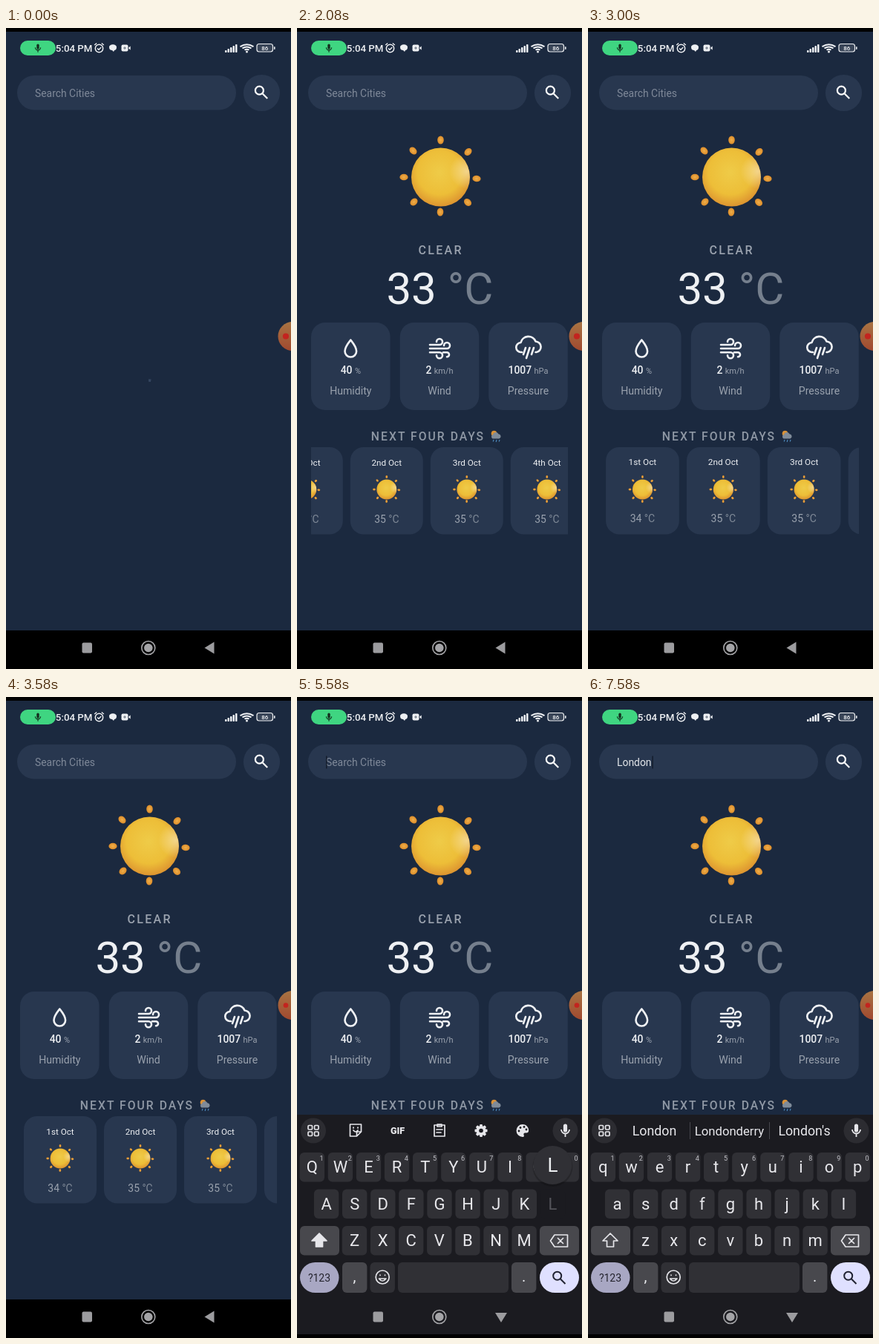
Write an HTML page that moves like this. It is 384 px wide and 864 px high and loops after 8000 ms.

```html
<!DOCTYPE html>
<html lang="en">
<head>
<meta charset="utf-8">
<title>Weather app</title>
<style>
  html, body { margin: 0; width: 100%; height: 100%; overflow: hidden; background: #000; }
  svg { display: block; width: 384px; height: 864px; font-family: Roboto, sans-serif; }
  .line { fill: none; stroke: #f0f2f5; stroke-width: 2.6; stroke-linecap: round; stroke-linejoin: round; }
  .thin { stroke-width: 1.7; stroke: #e6e6ea; }
</style>
</head>
<body>
<script>
const LOOP = 8000;
const BG = '#1b293f', CARD = '#28374f', WHITE = '#eef0f3', GREY = '#9aa2ae', DIM = '#757f8d';
const KEYBOARD = '#1b1b20', KEY = '#303035', KEY_ALT = '#48484d';

const rect = (x, y, w, h, r, fill, more = '') =>
  `<rect x="${x}" y="${y}" width="${w}" height="${h}" rx="${r}" fill="${fill}" ${more}/>`;
const disc = (x, y, r, fill, more = '') => `<circle cx="${x}" cy="${y}" r="${r}" fill="${fill}" ${more}/>`;
const path = (d, more = 'class="line"') => `<path d="${d}" ${more}/>`;
const label = (x, y, size, text, fill = WHITE, more = '') =>
  `<text x="${x}" y="${y}" font-size="${size}" fill="${fill}" text-anchor="middle" ${more}>${text}</text>`;
const group = (content, more = '') => `<g ${more}>${content}</g>`;
const span = (text, fill, more = '') => `<tspan fill="${fill}" ${more}>${text}</tspan>`;

function sun(x, y, scale) {
  const rays = [[0, -50], [37, -34], [48.5, 2], [36.5, 34], [-.5, 47], [-36, 33.5], [-49.5, 0], [-37, -35.5]];
  const dots = rays.map(([dx, dy]) => {
    const angle = Math.atan2(dy, dx) * 180 / Math.PI;
    return `<ellipse rx="5.6" ry="4.3" fill="url(#ray)" transform="translate(${dx} ${dy}) rotate(${angle})"/>`;
  });
  return group(dots.join('') + disc(0, 0, 39.5, 'url(#sun)') + disc(0, 0, 39.5, 'url(#glint)'),
    `class="sun" transform="translate(${x} ${y}) scale(${scale})"`);
}

function magnifier(x, y, color, width) {
  return path(`M${x + 2.5} ${y + 2.5}l6.5 6.5M${x + 3.7} ${y - 1.8}a5.5 5.5 0 1 1-11 0a5.5 5.5 0 1 1 11 0z`,
    `fill="none" stroke="${color}" stroke-width="${width}"`);
}

function mic(x, y, scale, color) {
  return group(rect(-2.6, -8.5, 5.2, 11, 2.6, color) +
    path('M-5.5-1a5.5 5.5 0 0 0 11 0M0 5v4', `fill="none" stroke="${color}" stroke-width="1.8"`),
    `transform="translate(${x} ${y}) scale(${scale})"`);
}

function statusBar() {
  const bars = [0, 1, 2, 3, 4].map(i => rect(295 + i * 3.5, 30 - i * 2, 2.5, 3 + i * 2, .8, WHITE)).join('');
  const wifi = [[3, 28.8], [6, 25.6], [9, 22.4]].map(([w, y]) =>
    path(`M${324.5 - w} ${y + w * .3}Q324.5 ${y - w * .35} ${324.5 + w} ${y + w * .3}`,
      `fill="none" stroke="${WHITE}" stroke-width="2"`)).join('');
  return rect(19, 17, 48, 20, 10, '#3fd581') + mic(43, 27, .65, '#14301f') +
    label(91.7, 32, 13.3, '5:04 PM', WHITE, 'font-weight="500"') +
    disc(125.5, 27.5, 5.2, 'none', `stroke="${WHITE}" stroke-width="1.5"`) +
    path('M119.2 23l3-2.5M131.8 23l-3-2.5M123 27.5l2 1.8 3.2-3.4', `fill="none" stroke="${WHITE}" stroke-width="1.4"`) +
    path('M139 26c0-5 10-5 10 0 0 3-2 4-3 4l-1 2-2-2c-2 0-4-1-4-4z', `fill="${WHITE}"`) +
    rect(155.5, 22.5, 9, 9, 2, WHITE) + path('M164 27l4-3v6zM160 25v4M158 27h4', `fill="${WHITE}" stroke="${BG}" stroke-width=".6"`) +
    bars + wifi + disc(324.5, 32, 1.5, WHITE) +
    rect(338, 21.5, 21.5, 10.5, 3, '#ffffff22', `stroke="${WHITE}" stroke-width="1.2"`) +
    rect(361, 25, 1.6, 4, .8, WHITE) + label(348.7, 29.8, 8, '86', WHITE, 'font-weight="500"');
}

function stat(x, icon, value, unit, name) {
  return rect(x - 53.3, 397, 106.6, 118, 19, CARD) + icon +
    label(x, 465.5, 13.9, value + ' ' + span(unit, GREY, 'font-size="11" font-weight="400"'), WHITE, 'font-weight="500"') +
    label(x, 493.5, 14.1, name, GREY);
}

function forecast() {
  return [['1st', 34], ['2nd', 35], ['3rd', 35], ['4th', 35]].map(([day, degrees], i) => {
    const x = 24 + i * 108;
    return rect(x, 565, 98, 117.5, 18, CARD) + label(x + 49, 589.5, 11.7, day + ' Oct') + sun(x + 49, 622, .34) +
      label(x + 49, 666.5, 13.9, degrees + ' ' + span('°C', '#7f8997'), GREY);
  }).join('');
}

function page() {
  const drop = path('M72.3 420.5c4 5 7.8 9.6 7.8 15.2a7.8 7.8 0 0 1-15.6 0c0-5.6 3.8-10.2 7.8-15.2z');
  const wind = path('M179 427H192a4 4 0 1 0-4-4M179 432H202a4 4 0 1 0-4-4M179 437.3H192a4 4 0 1 1-4 4M197 437.3h5a3 3 0 0 1 0 6');
  const rain = path('M303 437h-1a6.5 6.5 0 0 1-.5-13a10.5 10.5 0 0 1 20-1.5a7.3 7.3 0 0 1 1 14.5h-1M308 431l-3 9M313.5 431l-4.5 14M319 431l-3 9');
  return sun(193.5, 201, 1) +
    label(193.6, 305, 16, 'CLEAR', GREY, 'font-weight="500" letter-spacing="2.3"') +
    label(192.3, 372, 60, '33 ' + span('°C', DIM)) +
    stat(72.3, drop, '40', '%', 'Humidity') + stat(192, wind, '2', 'km/h', 'Wind') + stat(311.5, rain, '1007', 'hPa', 'Pressure') +
    label(176.5, 556, 15.7, 'NEXT FOUR DAYS', '#8f98a5', 'font-weight="500" letter-spacing="2.05"') +
    disc(265.5, 546.5, 3.8, '#d99238') +
    path('M263.5 553.5a3 3 0 0 1 .5-5.500a4 4 0 0 1 7.500-.7a3.200 3.200 0 0 1 1 6.200z', 'fill="#7f8b99"') +
    path('M265 555l-.8 2.500M269 555l-.8 3M273 555l-.8 2.500', 'stroke="#4c86b8" stroke-width="1.2"') +
    group(group(forecast(), 'id="cards"'), 'clip-path="url(#strip)"');
}

const keys = {};

function keyRow(letters, x, y) {
  return [...letters].map((letter, i) => {
    const cx = x + i * 38.1;
    keys[letter] = { x: cx, y: y + 19.5 };
    const digit = y === 614 ? label(cx + 12.8, y + 11, 9, (i + 1) % 10, '#c4c4ca') : '';
    return rect(cx - 16.7, y, 33.4, 39.5, 6, KEY, `id="box-${letter}"`) +
      label(cx, y + 27.3, 22, letter, '#e8e8ec', `id="key-${letter}"`) + digit;
  }).join('');
}

function toolbar() {
  const gear = [0, 45, 90, 135].map(a => rect(-1.9, -8.5, 3.8, 17, 1, '#e6e6ea', `transform="rotate(${a})"`)).join('');
  return path('M71.500 576h15v10l-6 6h-9zM86 586h-5.500v5.500M76 584q3 4 6 0M76 580v1M82 580v1', 'class="line thin"') +
    label(135.5, 588.6, 12.5, 'GIF', '#e6e6ea', 'font-weight="900"') +
    path('M185 577h14v15h-14zM189 576h6v3h-6zM188 583h8M188 587h6', 'class="line thin"') +
    group(gear + disc(0, 0, 6.5, '#e6e6ea') + disc(0, 0, 2.8, KEYBOARD), 'transform="translate(248 584.5)"') +
    path('M304 576a8.500 8.500 0 1 0 0 17c2.500 0 2-2 1.500-3s0-2.500 2-2.500h2c5 0 3-11.500-5.500-11.500z', 'fill="#e6e6ea"') +
    [[299, 585], [301, 580.500], [306, 579.500], [309, 583]].map(([x, y]) => disc(x, y, 1.400, KEYBOARD)).join('');
}

function keyboard() {
  const grid = [15, 23.5].map(x => [577.5, 586].map(y => rect(x, y, 5.5, 5.5, 1.2, 'none', 'class="thin" stroke="#e6e6ea"')).join('')).join('');
  const suggestions = [89.500, 190.500, 291.500].map((x, i) => label(x, 591, 17.8, '', '#e8e8ec', `id="hint${i}"`)).join('') +
    path('M137.500 573v23M244.500 573v23', 'stroke="#46464c"');
  return disc(22, 584.5, 17, '#2c2c31') + grid + disc(361.5, 584.5, 17, '#2c2c31') + mic(361.5, 584, 1, '#e6e6ea') +
    group(toolbar(), 'id="tools"') + group(suggestions, 'id="hints"') +
    keyRow('qwertyuiop', 20.3, 614) + keyRow('asdfghjkl', 39.6, 663.5) + keyRow('zxcvbnm', 77.5, 713) +
    rect(4, 713, 53, 39.5, 6, KEY_ALT) +
    path('M30 723l10 10h-5.500v8h-9v-8h-5.500z', 'id="shift" class="line thin"') +
    rect(327, 713, 53, 39.5, 6, KEY_ALT) +
    path('M347 725h17.500v16h-17.500l-5.500-8zM351.500 729.500l7 7M358.500 729.500l-7 7', 'class="line thin"') +
    rect(4, 762, 52.5, 41, 20.5, '#a8a7c3') + label(30, 787.5, 14, '?123', '#24242e') +
    rect(61, 762, 33.4, 41, 6, KEY_ALT) + label(77.5, 788, 20, ',') +
    rect(98.5, 762, 33.4, 41, 6, KEY) + disc(115.2, 782, 9, 'none', 'class="thin" stroke="#e6e6ea"') +
    path('M110.500 784q4.700 6 9.400 0zM112 779v.5M118.500 779v.5', 'class="line thin"') +
    rect(136, 762, 149, 41, 6, KEY) + rect(289, 762, 33.4, 41, 6, KEY_ALT) + label(305.7, 788, 20, '.') +
    rect(327, 762, 53, 41, 20.5, '#dfe0ff') + magnifier(352.5, 782, '#202231', 2) +
    group(disc(0, 2, 27, '#0003') + disc(0, 0, 26, '#303035') + label(0, 9, 26, '', WHITE, 'id="pressed"'), 'id="popup"');
}

document.body.innerHTML = `<svg viewBox="0 0 384 864" xmlns="http://www.w3.org/2000/svg">
  <defs>
    <radialGradient id="sun" cx=".48" cy=".42" r=".58">
      <stop offset="0" stop-color="#efcb48"/><stop offset=".65" stop-color="#edbe38"/><stop offset="1" stop-color="#dd9430"/>
    </radialGradient>
    <radialGradient id="glint" cx=".95" cy=".4" r=".3">
      <stop offset="0" stop-color="#f8e3a8" stop-opacity=".75"/><stop offset="1" stop-color="#f8e3a8" stop-opacity="0"/>
    </radialGradient>
    <radialGradient id="ray"><stop offset="0" stop-color="#f0b04a"/><stop offset="1" stop-color="#dc8c2a"/></radialGradient>
    <linearGradient id="bubble" x2="0" y2="1"><stop offset="0" stop-color="#a87443"/><stop offset="1" stop-color="#a1492f"/></linearGradient>
    <clipPath id="strip"><rect x="19" y="560" width="346" height="130"/></clipPath>
    <clipPath id="above"><rect width="384" height="812"/></clipPath>
  </defs>
  ${rect(0, 0, 384, 864, 0, '#000') + rect(0, 5, 384, 807, 0, BG) + statusBar()}
  ${rect(15, 64, 295, 46.5, 23.2, CARD) + disc(344.5, 87.5, 24.6, CARD) + magnifier(343.2, 86, '#fff', 2.2)}
  <text id="query" x="39" y="93" font-size="13.9"></text>
  ${rect(39, 79.5, 1.5, 17, 0, '#141d2c', 'id="caret"')}
  <circle id="loader" cx="192" cy="492" r="17" fill="none" stroke="#34455f" stroke-width="3.5" pathLength="100"/>
  ${group(page(), 'id="page"')}
  ${disc(386, 415.5, 19.5, 'url(#bubble)') + disc(377, 415.5, 3.8, '#c3241f', 'id="dot"')}
  <rect id="panel" width="384" fill="${KEYBOARD}"/>
  ${group(group(keyboard(), 'id="keyboard"'), 'clip-path="url(#above)"')}
  ${rect(102.5, 828.5, 13.5, 14, 2, '#9c9c9f') + disc(191.8, 835.5, 9, 'none', 'stroke="#a4a4a7" stroke-width="1.6"') + disc(191.8, 835.5, 5.8, '#a4a4a7')}
  ${path('M267.500 835.500l13-8v16z', 'id="back" fill="#9c9c9f"')}
</svg>`;

const el = id => document.getElementById(id);
const show = (id, on) => el(id).setAttribute('visibility', on ? 'visible' : 'hidden');

// Linear track through [time, value] points
function track(t, points) {
  if (t <= points[0][0]) return points[0][1];
  for (let i = 1; i < points.length; i++) {
    const [t0, a] = points[i - 1], [t1, b] = points[i];
    if (t < t1) return a + (b - a) * (t - t0) / (t1 - t0);
  }
  return points[points.length - 1][1];
}

const scroll = [[1930, 0], [2000, 26], [2080, 60], [2170, 78], [2260, 86], [2580, 86], [2700, 48], [2800, 16], [2880, 0]];
const stretchEnd = [[2260, 1], [2350, 1.02], [2580, 1]];
const stretchStart = [[2860, 1], [2930, 1.012], [3000, 1.008], [3250, 1.003], [3550, 1]];
const slide = [[4580, 255], [4670, 140], [4750, 60], [4830, 16], [4910, 0]];
const turn = [[4490, 0], [4580, -20], [4670, -50], [4900, -90]];
const presses = [['L', 5570, 5660], ['o', 5910, 6070], ['n', 6320, 6490], ['d', 6820, 6990], ['o', 7070, 7160], ['n', 7410, 7570]];
const hints = [['L', 'Love', 'Let'], ['Lo', 'Love', 'Look'], ['Long', 'London', 'Lone'], ['London', 'Londonderry', 'Lond'],
  ['London', 'Londonderry', 'Londo'], ['London', 'Londonderry', "London's"]];

function drawCards(t) {
  const end = track(t, stretchEnd);
  const scale = end * track(t, stretchStart);
  const anchor = end > 1 ? 365 : 19;
  el('cards').setAttribute('transform',
    `translate(${anchor} 0) scale(${scale} 1) translate(${-anchor - track(t, scroll)} 0)`);
}

function drawKeyboard(t) {
  const open = t >= 4490, offset = track(t, slide);
  show('panel', open);
  show('keyboard', open);
  el('panel').setAttribute('y', 563 + offset);
  el('panel').setAttribute('height', 296 - offset);
  el('keyboard').setAttribute('transform', `translate(0 ${offset})`);
  el('back').setAttribute('transform', `rotate(${track(t, turn)} 275 835.5)`);
}

function drawTyping(t) {
  const typed = presses.filter(press => t >= press[2]).map(press => press[0]).join('');
  const current = presses.find(press => t >= press[1] && t < press[2]);
  const caps = !typed;
  const held = current && current[0].toLowerCase();
  for (const letter in keys) {
    el('key-' + letter).textContent = caps ? letter.toUpperCase() : letter;
    el('key-' + letter).setAttribute('fill', letter === held ? '#55555b' : '#e8e8ec');
    el('box-' + letter).setAttribute('fill', letter === held ? KEYBOARD : KEY);
  }
  el('popup').style.display = held ? '' : 'none';
  if (held) {
    el('popup').setAttribute('transform', `translate(${keys[held].x} ${keys[held].y - 52})`);
    el('pressed').textContent = current[0];
  }
  el('shift').style.fill = caps ? '#e6e6ea' : 'none';
  el('tools').style.display = caps ? '' : 'none';
  el('hints').style.display = caps ? 'none' : '';
  if (typed) hints[typed.length - 1].forEach((word, i) => {
    el('hint' + i).textContent = word;
    el('hint' + i).setAttribute('font-size', word.length > 9 ? 16.7 : 17.8);
  });
  const query = el('query');
  query.textContent = typed || 'Search Cities';
  query.setAttribute('fill', typed ? '#e3e6ea' : '#7f8999');
  show('caret', t >= 4320);
  el('caret').setAttribute('x', 39 + (typed ? query.getComputedTextLength() + .8 : 0));
}

function draw(t) {
  const loaded = t >= 330;
  show('loader', !loaded);
  show('page', loaded);
  el('loader').setAttribute('stroke-dasharray', `${3 + t * .12} 100`);
  el('loader').setAttribute('transform', `rotate(${-90 + t * .2} 192 492)`);
  document.querySelectorAll('.sun').forEach(s => s.style.filter = t < 660 ? 'saturate(.75) brightness(.86)' : '');
  el('dot').setAttribute('r', 3.7 + .4 * Math.cos(t * Math.PI / 500));
  drawCards(t);
  drawKeyboard(t);
  drawTyping(t);
}

const start = performance.now();
function tick() {
  draw((performance.now() - start) % LOOP);
  requestAnimationFrame(tick);
}
tick();
</script>
</body>
</html>
```
